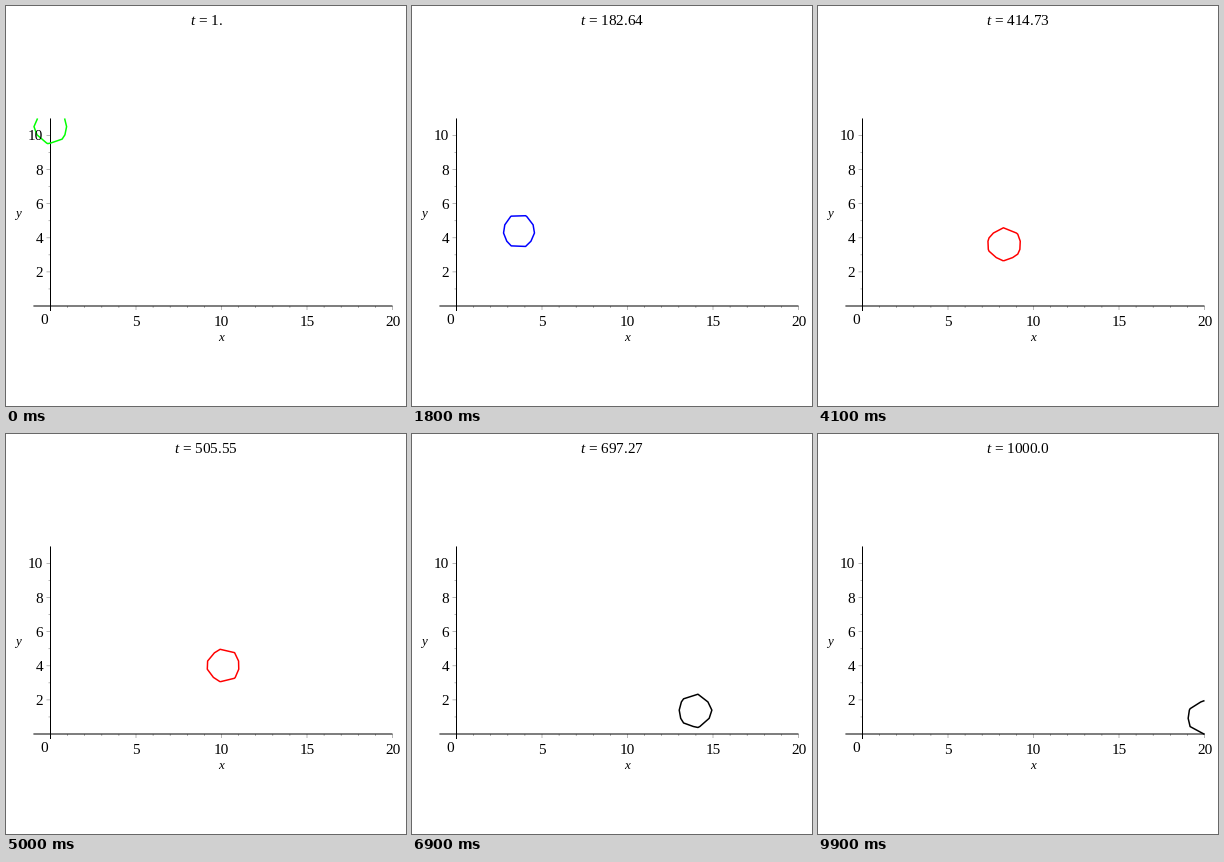
Recreate the animation shown at these times as a matplotlib script. Size 400 by 400 pixels, loop 10 s.

```python
import matplotlib.pyplot as plt
import numpy as np
from matplotlib.animation import FuncAnimation

SIZE, DPI, FRAMES = 400, 100, 100
PX = 72 / DPI                       # one pixel in points
X0, Y0 = 44.5, 300                  # origin of the plot in pixels
G, HEIGHT, FLOOR = 10, 10, 0.5
BOUNCE = np.sqrt(0.66)              # speed kept at each impact
COLORS = ["#00ff00", "#0000ff", "#ff0000", "#000000"]

plt.rcParams.update({
    "font.family": "Liberation Serif",
    "mathtext.fontset": "custom",
    "mathtext.rm": "Liberation Serif",
    "mathtext.it": "Liberation Serif:italic",
})


def px(x):
    return X0 + 17.1 * x


def py(y):
    return Y0 - 17.05 * y


fig = plt.figure(figsize=(SIZE / DPI, SIZE / DPI), dpi=DPI, facecolor="white")
ax = fig.add_axes([0, 0, 1, 1])
ax.set_xlim(0, SIZE)
ax.set_ylim(SIZE, 0)
ax.axis("off")


def stroke(x0, y0, x1, y1, color="black", width=1.0):
    ax.plot([x0, x1], [y0, y1], color=color, lw=width * PX,
            solid_capstyle="butt", snap=False, zorder=1)


def label(x, y, text, size=15.2, ha="center", **kw):
    return ax.text(x, y, text, fontsize=size * PX, ha=ha, va="baseline", **kw)


def draw_axes():
    for i in range(1, 21):
        stroke(px(i), Y0, px(i), Y0 + (4 if i % 5 == 0 else 2), "#888888", 0.6)
    for i in range(1, 11):
        stroke(X0, py(i), X0 - (4 if i % 2 == 0 else 2), py(i), "#888888", 0.6)
    stroke(px(-1), Y0, px(20), Y0)
    stroke(X0, py(11), X0, Y0 + 5)
    for i in range(5, 21, 5):
        label(px(i), 320, str(i))
    for i in range(2, 11, 2):
        label(37, py(i) + 5, str(i), ha="right")
    label(38.5, 318, "0")
    label(215, 335, "x", 13, style="italic")
    label(12, 211, "y", 13, style="italic")


def ball(s):
    """Height of the centre and number of impacts after s seconds."""
    half = np.sqrt(2 * HEIGHT / G)
    start, span, hits = -half, 2 * half, 0
    while s >= start + span:
        start += span
        span *= BOUNCE
        hits += 1
    return FLOOR + G / 2 * (s - start) * (start + span - s), hits


# The coarse grid turns the circle into a polygon that changes as it moves.
gx, gy = np.meshgrid(np.linspace(-1, 20, 26), np.linspace(-1, 11, 26))
draw_axes()
title = label(200, 19, "")
curve = None


def update(k):
    global curve
    t = 1 + 999 * k / (FRAMES - 1)
    y, hits = ball(t / 100)
    if curve is not None:
        curve.remove()
    curve = ax.contour(px(gx), py(gy), (gx - t / 50) ** 2 + (gy - y) ** 2 - 1, [0],
                       colors=COLORS[min(hits, 3)], linewidths=1.5 * PX, zorder=2)
    title.set_text("$t$ = " + ("1." if k == 0 else f"{t:#.5g}"))
    return ()


anim = FuncAnimation(fig, update, frames=FRAMES, interval=100,
                     init_func=lambda: update(0), repeat=True, repeat_delay=0)
plt.show()
```
